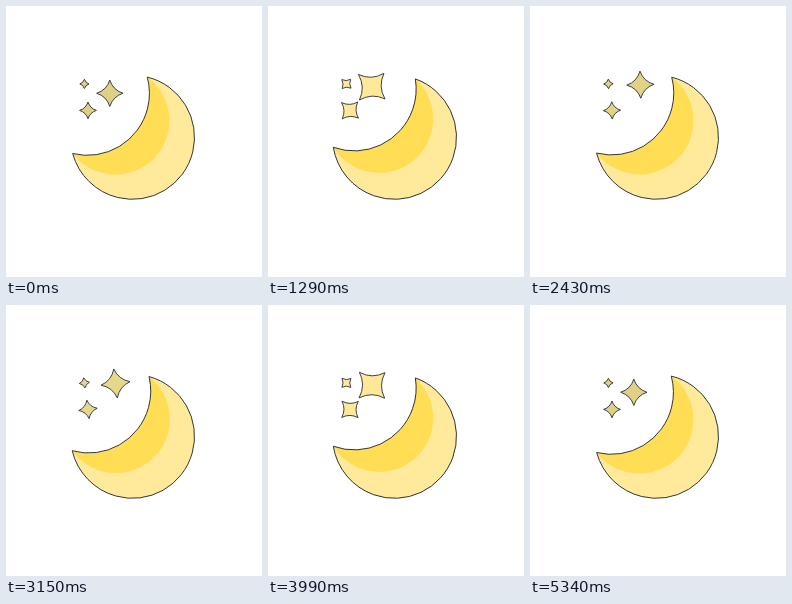
Recreate the animation shown at these times as an HTML page with a canvas. Size 256x271 px, loop 5370 ms.

```html
<!DOCTYPE html>
<html lang="en">
<head>
<meta charset="utf-8">
<title>Moon and stars</title>
<style>
  html, body { margin: 0; width: 100%; height: 100%; overflow: hidden; background: #fff; }
  canvas { display: block; width: 256px; height: 271px; }
</style>
</head>
<body>
<canvas id="stage"></canvas>
<script>
const W = 256, H = 271, LOOP = 5370, STEP = 30, TRAVEL = LOOP - STEP;
const LINE = "#2a2d36", PALE = "#ffe99a", GOLD = "#ffde56";
const DIM = [222, 208, 133], LIT = [255, 233, 152];
const canvas = document.getElementById("stage");
const ctx = canvas.getContext("2d");
const dpr = window.devicePixelRatio || 1;
canvas.width = W * dpr;
canvas.height = H * dpr;

const rad = deg => deg * Math.PI / 180;
const mix = (a, b, k) => a + (b - a) * k;
const wave = turns => (1 - Math.cos(turns * 2 * Math.PI)) / 2;

function outline() {
  ctx.strokeStyle = LINE;
  ctx.lineWidth = 0.9;
  ctx.lineJoin = "round";
  ctx.stroke();
}

// Crescent in local axes: x runs from the outer centre towards the cut.
function moon(sway) {
  const r = 62, half = 31.5;
  const h = Math.sqrt(r * r - half * half);
  const tip = Math.atan2(h, half);
  const bulge = 61.6, shadeR = (h * h + bulge * bulge) / (2 * bulge);
  const shadeX = half - (bulge - shadeR);
  const shadeTip = Math.atan2(h, half - shadeX);

  const crescent = (x, radius, end) => {
    ctx.beginPath();
    ctx.arc(x, 0, radius, end, -end);
    ctx.arc(2 * half, 0, r, Math.PI + tip, Math.PI - tip, true);
    ctx.closePath();
  };

  ctx.save();
  ctx.translate(126.5, 131.3);
  ctx.rotate(rad(mix(224.3, 230.2, sway)));

  crescent(0, r, tip);
  ctx.fillStyle = PALE;
  ctx.fill();

  crescent(shadeX, shadeR, shadeTip);
  ctx.fillStyle = GOLD;
  ctx.fill();

  crescent(0, r, tip);
  outline();
  ctx.restore();
}

function star(x, y, r, angle, color) {
  const waist = r * 0.24 * Math.SQRT2;
  const at = (len, a) => [x + len * Math.cos(a), y + len * Math.sin(a)];
  ctx.beginPath();
  ctx.moveTo(...at(r, angle));
  for (let i = 0; i < 4; i++) {
    const a = angle + i * Math.PI / 2;
    ctx.quadraticCurveTo(...at(waist, a + Math.PI / 4), ...at(r, a + Math.PI / 2));
  }
  ctx.closePath();
  ctx.fillStyle = color;
  ctx.fill();
  outline();
}

function draw(ms) {
  const turn = Math.floor((ms % LOOP) / STEP) * STEP / TRAVEL;
  const swing = wave(turn);
  const pulse = wave(turn * 2);
  const angle = rad(90 * swing);
  const size = mix(1, 1.37, pulse);
  const color = `rgb(${DIM.map((c, i) => Math.round(mix(c, LIT[i], pulse)))})`;
  const orbit = rad(143 + 152 * swing);

  ctx.setTransform(dpr, 0, 0, dpr, 0, 0);
  ctx.fillStyle = "#fff";
  ctx.fillRect(0, 0, W, H);
  moon(pulse);
  star(108.3 + 5.6 * Math.cos(orbit), 83.9 + 5.6 * Math.sin(orbit), 13.2 * size, angle, color);
  star(82, 104.4, 8.4 * size, angle, color);
  star(78.4, 77.9, 4.6 * size, angle, color);
}

const start = performance.now();
function frame() {
  draw(performance.now() - start);
  requestAnimationFrame(frame);
}
draw(0);
requestAnimationFrame(frame);
</script>
</body>
</html>
```
